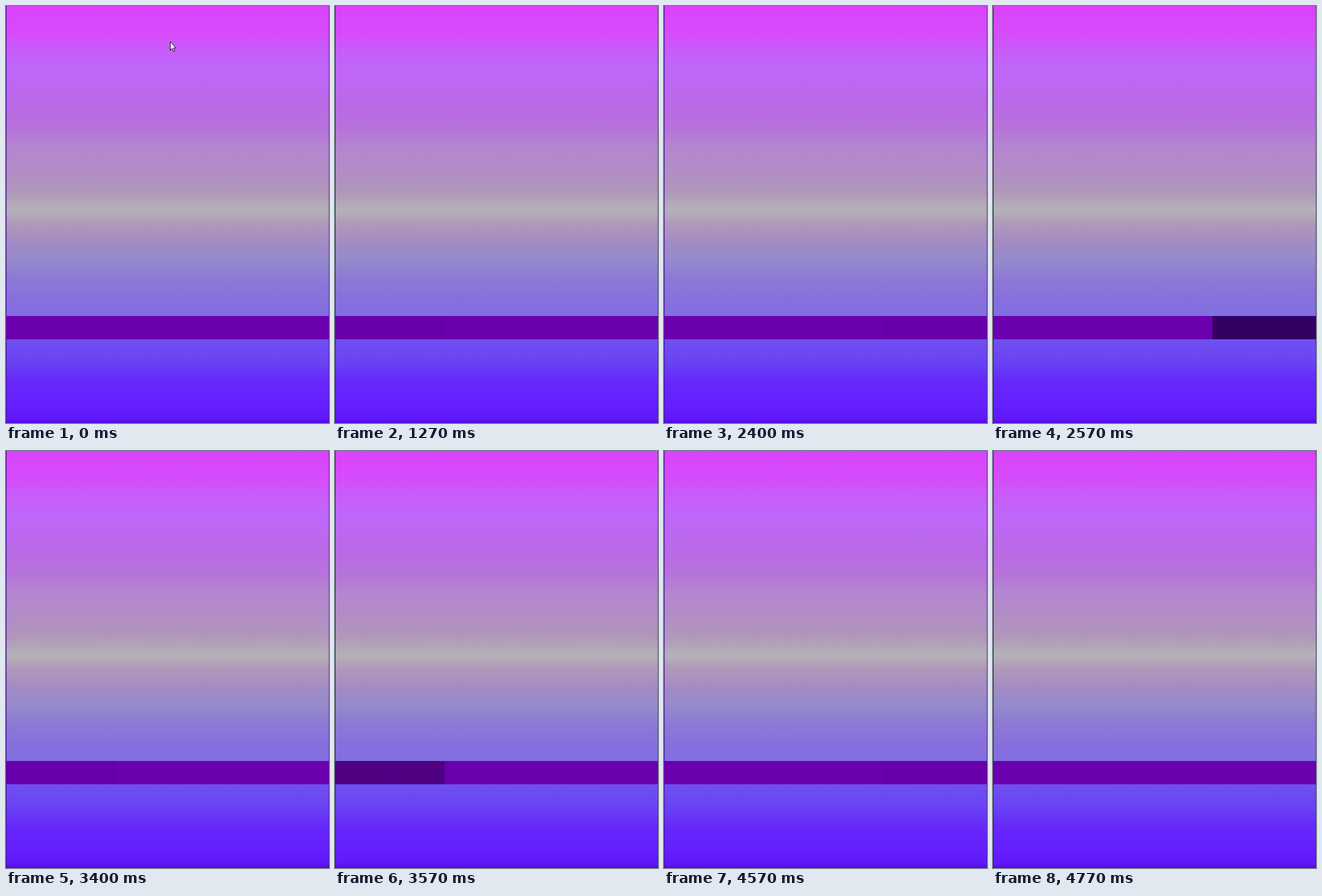
These frames come from a looping animation (471x608 px, 5.25 s). An HTML page:

```html
<!DOCTYPE html>
<html lang="en">
<head>
<meta charset="utf-8">
<title>Gradient tabs</title>
<style>
html, body { margin: 0; width: 100%; height: 100%; overflow: hidden; background: #6420ff; }
svg { display: block; width: 471px; height: 608px; }
</style>
</head>
<body>
<svg viewBox="0 0 471 608" shape-rendering="crispEdges">
  <defs>
    <linearGradient id="sky" gradientUnits="userSpaceOnUse" x1="0" y1="0" x2="0" y2="608"></linearGradient>
  </defs>
  <rect width="471" height="608" fill="url(#sky)"/>
  <rect width="1" height="608" fill="#3c0c90" opacity=".8"/>
  <rect x="470" width="1" height="608" fill="#30106c" opacity=".3"/>
  <rect y="452" width="471" height="34" fill="#6a00ae"/>
  <g id="tabs">
    <rect y="452" width="160" height="34"/>
    <rect x="160" y="452" width="160" height="34"/>
    <rect x="320" y="452" width="151" height="34"/>
  </g>
  <path id="pointer" shape-rendering="auto" d="M239.5 52 V64.5 L242.3 61.8 L244.3 66.5 L246.2 65.7 L244.2 61.1 H247.8 Z"
    fill="#fff" stroke="#201030" stroke-width="1"/>
</svg>
<script>
const LOOP = 5250;
const SVG = "http://www.w3.org/2000/svg";
const stops = [
  [0, "#da42fc"], [40, "#d64cfb"], [65, "#c85cfa"], [90, "#c066fa"],
  [120, "#bc68f0"], [150, "#b96ae4"], [180, "#b674da"], [208, "#b486d0"],
  [245, "#b28ec4"], [272, "#b098ba"], [298, "#b4b2b8"], [318, "#b098ba"],
  [345, "#a28cc4"], [372, "#948acc"], [395, "#8e7ad4"], [425, "#8870dc"],
  [452, "#806ee2"], [486, "#7050f0"], [520, "#6a42f4"], [548, "#6628fa"],
  [580, "#6420fe"], [602, "#6018fa"], [608, "#5408dc"]
];
for (const [y, color] of stops) {
  const stop = document.createElementNS(SVG, "stop");
  stop.setAttribute("offset", y / 608);
  stop.setAttribute("stop-color", color);
  document.getElementById("sky").append(stop);
}

// steps: [ms since press, darkness], held until the next entry
const soft = {
  shade: "#00001c",
  steps: [[0, .03], [30, .16], [70, .4], [100, .66], [130, .8], [170, .5], [200, .2], [230, 0]]
};
const hard = {
  shade: "#000",
  steps: [[0, .03], [40, .6], [70, 1], [130, .6], [160, .25], [200, 0]]
};
const tabs = [...document.getElementById("tabs").children];
const pointer = document.getElementById("pointer");
const presses = [
  [1270, 0, soft], [1840, 1, soft], [2400, 2, soft],
  [3400, 0, hard], [3970, 1, hard], [4570, 2, hard]
];

function darkness(steps, t) {
  let level = 0;
  for (const [at, value] of steps) if (t >= at) level = value;
  return level;
}

function draw(t) {
  for (const tab of tabs) tab.setAttribute("opacity", 0);
  for (const [start, index, press] of presses) {
    const level = darkness(press.steps, t - start);
    if (!level) continue;
    tabs[index].setAttribute("fill", press.shade);
    tabs[index].setAttribute("opacity", level);
  }
  pointer.setAttribute("visibility", t < 30 ? "visible" : "hidden");
}

let begin = null;
function tick(now) {
  if (begin === null) begin = now;
  draw((now - begin) % LOOP);
  requestAnimationFrame(tick);
}
draw(0);
requestAnimationFrame(tick);
</script>
</body>
</html>
```
